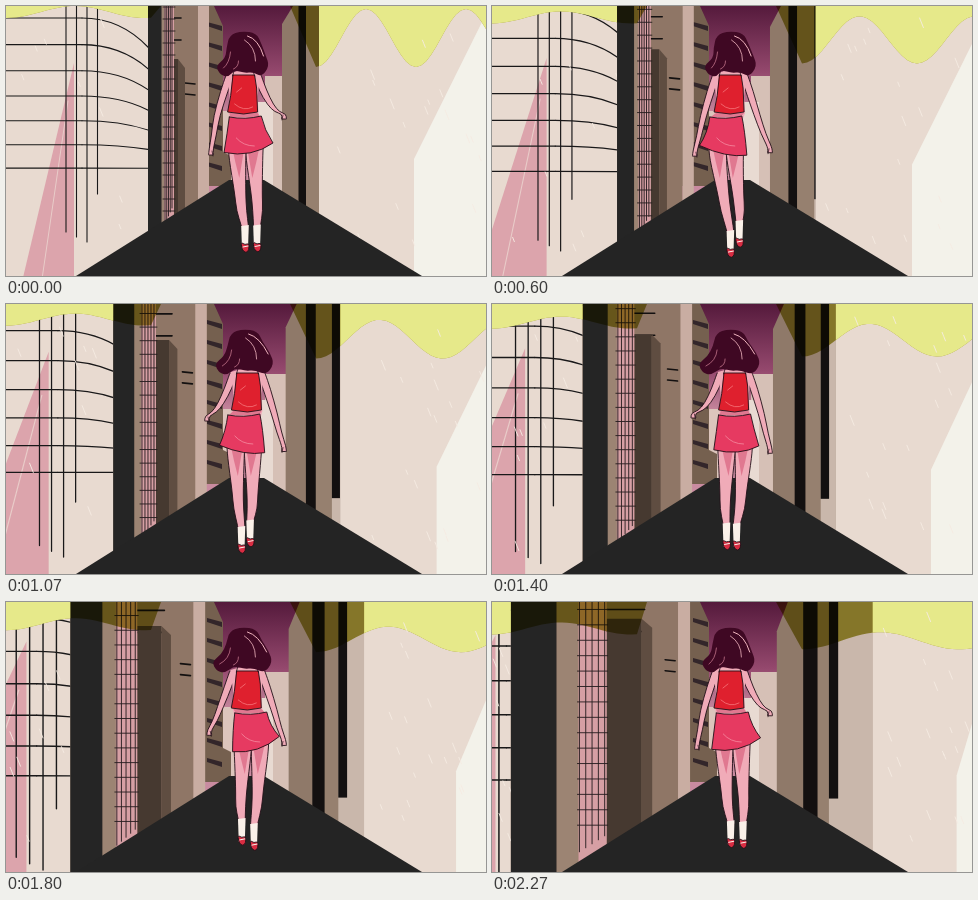
Recreate the animation shown at these times as an HTML page with a canvas. Size 480 by 270 pixels, loop 2340 ms.

```html
<!DOCTYPE html>
<html lang="en">
<head>
<meta charset="utf-8">
<title>City walk</title>
<style>
html, body { margin: 0; width: 100%; height: 100%; overflow: hidden; background: #242424; }
canvas { display: block; width: 100vw; height: 100vh; }
</style>
</head>
<body>
<canvas id="stage" width="480" height="270"></canvas>
<script>
const g = document.getElementById('stage').getContext('2d');
const LOOP = 2340, STEPS = 35, TAU = Math.PI * 2;
const INK = '#221018', SKIN = '#f0abb8', SHADE = '#e07890';
const WALL = '#e8dad0', BLACK = '#131010';

let t = 0, step = 0;

// Periodic motion: one walk cycle per loop
function wave(mean, cos, sin, cos2 = 0) {
  const a = t * 1000 / LOOP * TAU;
  return mean + cos * Math.cos(a) + sin * Math.sin(a) + cos2 * Math.cos(2 * a);
}

// Horizontal place of an upright edge as the camera moves forward
function near(x, speed) {
  const d = x - 240;
  return 240 + d / (1 - Math.abs(d) * speed * t / 1000);
}

function rect(color, x1, x2, y1 = 0, y2 = 270) {
  g.fillStyle = color;
  g.fillRect(x1, y1, x2 - x1, y2 - y1);
}

function paint(fill, ink) {
  if (fill) { g.fillStyle = fill; g.fill(); }
  if (ink) { g.strokeStyle = ink; g.lineWidth = .9; g.stroke(); }
}

function poly(fill, points, ink) {
  g.beginPath();
  points.forEach(p => g.lineTo(...p));
  g.closePath();
  paint(fill, ink);
}

function blob(fill, points, ink) {
  const mid = (a, b) => [(a[0] + b[0]) / 2, (a[1] + b[1]) / 2];
  g.beginPath();
  g.moveTo(...mid(points[points.length - 1], points[0]));
  points.forEach((p, i) => g.quadraticCurveTo(...p, ...mid(p, points[(i + 1) % points.length])));
  paint(fill, ink);
}

function line(color, width, x1, y1, x2, y2, bx = (x1 + x2) / 2, by = (y1 + y2) / 2) {
  g.beginPath();
  g.moveTo(x1, y1);
  g.quadraticCurveTo(bx, by, x2, y2);
  g.strokeStyle = color;
  g.lineWidth = width;
  g.stroke();
}

function clipped(x1, x2, draw) {
  g.save();
  g.beginPath();
  g.rect(x1, 0, x2 - x1, 270);
  g.clip();
  draw();
  g.restore();
}

function scratches(x1, x2, count, seed) {
  let s = seed * 977 + 31;
  const random = () => (s = (s * 16807) % 2147483647) / 2147483647;
  random();
  for (let i = 0; i < count; i++) {
    const x = x1 + random() * (x2 - x1), y = 10 + random() * 235, n = 4 + random() * 6;
    line('#f5ebe3', .9, x, y, x + n * .4, y + n);
  }
}

// Wavy yellow light along the top of each side of the street
function glow(color) {
  const left = [[0, 0]], right = [[284, 0]];
  for (let x = 0; x <= 145; x += 5) left.push([x, 6 + 9 * t + 6 * Math.cos(x / 22)]);
  for (let x = 310; x <= 480; x += 5) {
    right.push([x, 32 + 3 * t + (29 - 9 * t) * Math.cos(TAU * (x - 310) / (100 + 25 * t))]);
  }
  poly(color, [...left, [155, 0]]);
  poly(color, [...right, [480, 0]]);
}

function backdrop() {
  const sky = g.createLinearGradient(0, 0, 0, 110);
  sky.addColorStop(0, '#551a3c');
  sky.addColorStop(.6, '#94486d');
  sky.addColorStop(1, '#c98ba0');
  rect(sky, 190, 300);
  rect('#dcc5bc', 214, 236, 105);
  rect('#d6c0b6', 259, 290, 70);
  rect('#e8dad2', 247, 267, 96);
  poly('#75604f', [[190, 0], [208, 0], [217, 20], [217, 146], [225, 150], [225, 180], [190, 180]]);
  for (let y = 16; y < 175; y += 20) {
    poly('#33262a', [[201, y], [216, y + 4], [216, y + 9], [201, y + 4]]);
  }
}

function gridWall(left, right) {
  rect('#d69fa4', left, right);
  for (let i = 0; i < 5; i++) {
    const x = left + 1 + (right - left - 3) * i / 4;
    line('#241b1d', .9, x, 0, x, 218 + 14 * t - i * 4);
  }
  const gap = 12 + 1.5 * t;
  for (let y = 205 + 8 * t; y > 0; y -= gap) line('#241b1d', .9, left - 1, y, right + 1, y);
}

// Curved front: everything on it grows from one fixed point
function curvedFront(edge) {
  rect(WALL, 0, edge);
  const scale = 1 / (1 - .12 * t);
  g.save();
  g.translate(240, 120);
  g.scale(scale, scale);
  g.translate(-240, -120);
  poly('#dca4ac', [[68, 57], [68, 280], [15 - 30 * t, 280]]);
  line('#e9ccc9', 1, 62, 95, 35 - 20 * t, 280);
  for (let i = 0; i < 7; i++) {
    const y = 12 + 27 * i - i * i * .33;
    line('#191819', 1.1, -10, y, 76, y);
    line('#191819', 1.1, 76, y, 143, y + (163 - y) * .2, 115, y);
  }
  for (let i = 0; i < 4; i++) {
    const x = 60 + i * 10.5;
    line('#191819', 1.1, x, -30, x, i < 3 ? 226 + i * 5 : 188);
  }
  g.restore();
  scratches(0, edge, 8, (step >> 1) + 7);
}

function leftStreet() {
  const tower = near(203, 1.4), pale = near(192, 1);
  rect('#8f7666', 0, pale);
  rect('#c9ada2', pale, tower);
  for (const y of [77, 88]) line(BLACK, 1.6, pale - 13, y - 8.5 * t, pale - 3, y - 8.5 * t + 1);

  const corner = near(172, 1.6), end = near(179, 1.7);
  const gridL = near(158, 2.5), gridR = near(168, 2.6), top = 53 - 16 * t;
  for (const y of [12, 34]) line(BLACK, 1.6, gridR, y - 2 * t, corner + 3, y - 2 * t);
  poly('#463930', [[gridR, top], [corner, top], [corner, 270], [gridR, 270]]);
  poly('#5f4d41', [[corner, top], [end, top + 9], [end, 270], [corner, 270]]);

  const edge = near(142, 2.5), pillar = near(155.5, 2.7);
  rect('#9c8473', pillar, gridL);
  gridWall(gridL, gridR);
  rect('#252525', edge, pillar);
  clipped(0, edge, () => curvedFront(edge));
  return edge;
}

function rightStreet() {
  const wall = near(313, 2.9), block = near(276, 2.4);
  const dark = near(292.5, 2.2), darkEnd = near(300, 2.2), slot = near(318, 1.1);
  const top = 18 + 5 * t;
  poly('#8f7969', [[block, top], [block + 11, 0], [wall, 0], [wall, 270], [block, 270]]);
  rect(BLACK, dark, darkEnd);
  rect('#96806f', darkEnd, slot);
  rect('#c9b7ab', slot, wall);
  rect(BLACK, slot, slot + 7 + t, 0, 192 + 2 * t);
  rect(WALL, wall, 480);
  const light = near(408, .66);
  poly('#f3f2ea', [[480, 8 + 50 * t], [light, 153 + 9 * t], [light, 270], [480, 270]]);
  return wall;
}

function street() {
  backdrop();
  const leftEdge = leftStreet(), rightEdge = rightStreet();
  g.globalCompositeOperation = 'multiply';
  glow('#a9a53c');
  g.globalCompositeOperation = 'source-over';
  clipped(0, leftEdge, () => glow('#e6e98a'));
  clipped(rightEdge, 480, () => glow('#e6e98a'));
  scratches(rightEdge + 10, 475, 18, (step >> 1) + 3);
  poly('#242424', [[70, 270], [223, 174], [258, 174], [416, 270]]);
}

// Tapered shape around a chain of [x, y, half width]
function limb(chain) {
  const left = chain.map(([x, y, w]) => [x - w, y]);
  const right = chain.map(([x, y, w]) => [x + w, y]).reverse();
  blob(SKIN, [left[0], ...left, left[left.length - 1], right[0], ...right, right[right.length - 1]], INK);
}

function arm(side, chest, x, y) {
  const ex = chest + 27 * side, ey = 100 + (y - 116) * .31;
  limb([[chest + 14 * side, 69, 3.5], [chest + 19 * side, 84, 3.8], [ex, ey, 3],
    [(ex + x) / 2, (ey + y) / 2, 2.4], [x, y - 5, 2], [x, y, 2.4]]);
  line(INK, .7, x - side, y - 4, x - side * 2, y + 1);
}

function leg(hip, x, y, side) {
  const ankle = y - 23, knee = (hip + x) / 2 + side;
  limb([[hip, 138, 9], [hip, 152, 8.4], [knee, 187, 5.5], [(knee + x) / 2 + side, 205, 5], [x, ankle, 3.5], [x, ankle + 4, 3.3]]);
  poly(SHADE, [[hip - side * 7, 142], [hip + side * 5, 142], [hip + side * 2, 156], [hip - side * 2, 172], [hip - side * 4, 160]]);
  poly('#faf1e9', [[x - 3.8, ankle], [x + 3.8, ankle - 1], [x + 3, y], [x - 3, y]]);
  blob('#d82d42', [[x - 4, y - 7], [x, y - 4], [x + 4, y - 6], [x + 4, y + 1], [x + 1, y + 4], [x - 3, y + 1]], INK);
  line('#faf1e9', 1, x - 2, y - 2, x + 3, y - 3);
}

function torso(c, hip) {
  poly(SKIN, [[c - 5, 58], [c + 5, 58], [c + 6, 65], [c + 17, 68], [c + 14, 90], [c + 15, 107],
    [hip + 16, 116], [hip - 16, 116], [c - 15, 106], [c - 14, 90], [c - 17, 68], [c - 6, 65]]);
  poly(SHADE, [[c - 14, 107], [c + 14, 107], [hip + 15, 111], [hip - 15, 111]]);
  poly('#df202e', [[c - 11, 69], [c + 11, 69], [c + 13, 82], [c + 14, 106], [c, 108], [c - 16, 106], [c - 13, 90]], INK);
  for (const side of [-1, 1]) line(INK, .8, c + 11 * side, 70, c + 9 * side, 63);
  line('#f7777c', .8, c - 9, 98, c + 9, 101, c, 106);
  line('#f7777c', .8, c - 7, 86, c - 2, 82);
}

function skirt(hip) {
  const lx = wave(217, 1, -9.5), ly = wave(144.5, 2, -5);
  const rx = wave(264, 3, -9), ry = wave(142, -5, 7);
  g.beginPath();
  g.moveTo(hip - 16, 111);
  g.quadraticCurveTo(hip, 114, hip + 16, 110);
  g.quadraticCurveTo(hip + 19, 124, rx, ry);
  g.quadraticCurveTo((lx + rx) / 2 + 3, 152, lx, ly);
  g.quadraticCurveTo(hip - 18, 127, hip - 16, 111);
  paint('#e63a61', INK);
  line('#f58ba0', .8, hip - 9, 132, hip + 9, 140, hip - 2, 140);
}

function hair() {
  const l = wave(211.5, 1, 3), r = wave(264, -2.5, -1), m = wave(238, -.5, .5);
  blob('#3f0823', [[m - 14, 29], [m - 2, 25], [m + 13, 27], [m + 18, 38], [r - 2, 49], [r + 2, 60],
    [r - 6, 71], [m + 10, 66], [m + 1, 67], [m - 9, 64], [l + 10, 71], [l + 2, 69], [l - 3, 60], [l + 7, 52], [m - 17, 42]]);
  line('#f2b6c0', 1, m + 4, 30, r - 4, 50, m + 15, 33);
  line('#f2b6c0', .8, m + 1, 34, m + 12, 55, m + 12, 41);
  line('#d58398', .7, m - 13, 46, l + 5, 62, m - 14, 57);
  line('#d58398', .7, m - 5, 55, m - 10, 63, m - 5, 61);
}

function woman() {
  const chest = wave(239.8, -2.2, -1.8), hip = wave(239.3, 0, -5.5);
  leg(hip + 9, wave(247.5, 3.5, 0), wave(241.5, 1, -3.5), 1);
  leg(hip - 8, wave(237, 2, 1.5), wave(244, -1, 4), -1);
  arm(-1, chest, wave(203, 2, 0), wave(136, 18, 10, -5));
  arm(1, chest, wave(278, 0, 0), wave(138, -17, 0, -8));
  torso(chest, hip);
  skirt(hip);
  hair();
}

function frame(now) {
  step = Math.min(STEPS - 1, Math.floor((now % LOOP + 6) * STEPS / LOOP));
  t = step * LOOP / STEPS / 1000;
  street();
  woman();
}

g.lineJoin = g.lineCap = 'round';
const start = performance.now();
(function run() {
  frame(performance.now() - start);
  requestAnimationFrame(run);
})();
</script>
</body>
</html>
```
